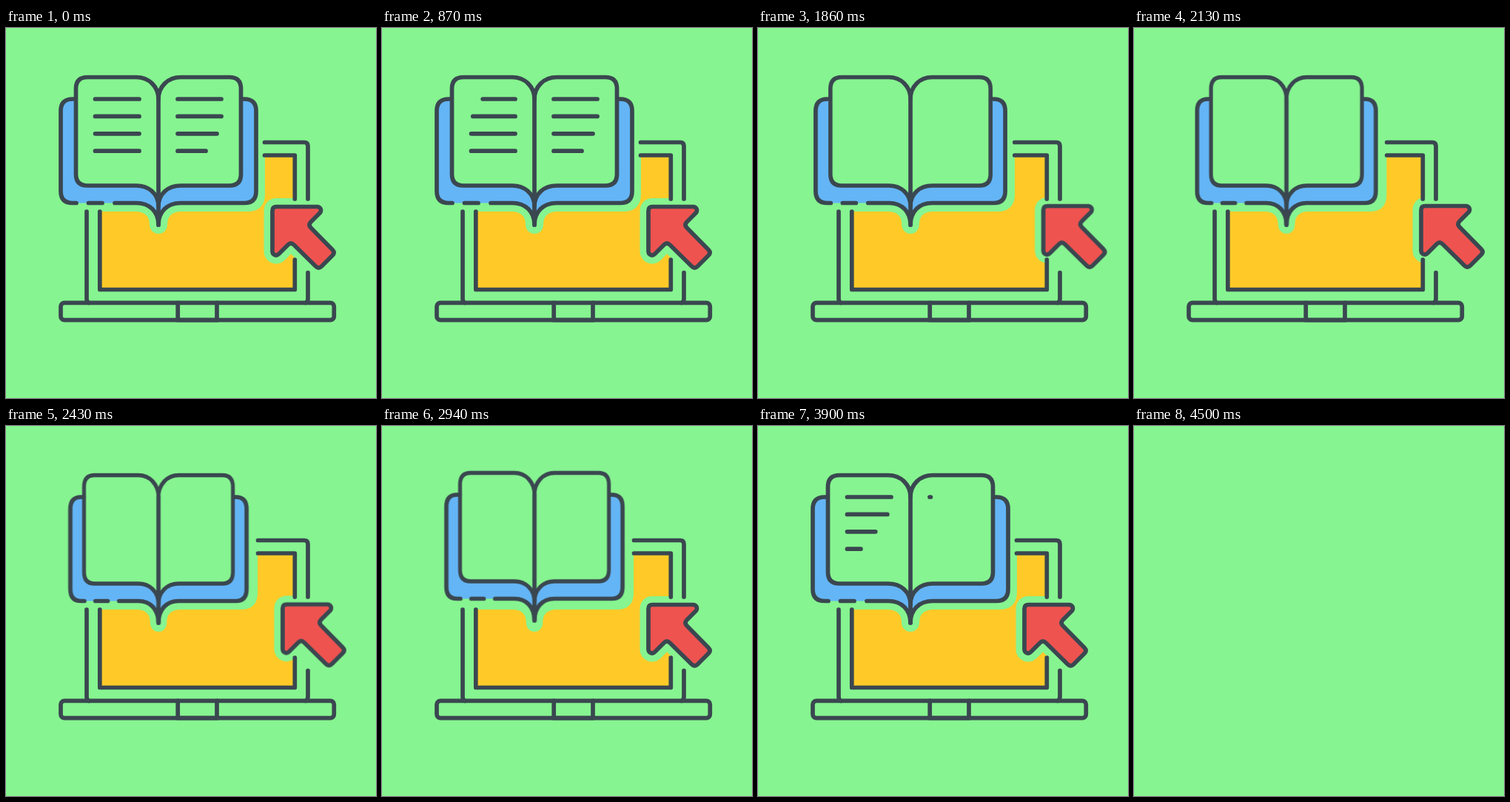
Recreate the animation shown at these times as an HTML page without scripts. Size 500 by 500 pixels, loop 4.53 s.

```html
<!DOCTYPE html>
<html lang="en">
<head>
<meta charset="utf-8">
<title>Online reading</title>
<style>
  :root { --bg: #86f490; --ink: #3a4750; }
  html, body { margin: 0; width: 100%; height: 100%; overflow: hidden; background: var(--bg); }
  svg { display: block; width: 500px; height: 500px; }

  .scene, .hop, .fold, .halo, .arrow, .edge, .row {
    animation: 4.53s cubic-bezier(.33, 0, .67, 1) infinite both;
  }
  .scene { animation-name: cut; animation-timing-function: step-end; }
  .hop { animation-name: hop; }
  .fold { animation-name: fold; transform-origin: 206px 0; }
  .halo { animation-name: halo; transform-origin: 206px 0; fill: var(--bg); }
  .arrow { animation-name: point; }
  .edge { animation-name: edge; stroke-dasharray: 300 300; }
  .row {
    --l: 60px;
    animation-name: write;
    animation-delay: calc(var(--i) * 78ms);
    stroke-dasharray: var(--l) 300px;
  }

  .ink { fill: none; stroke: var(--ink); stroke-width: 5.7; stroke-linecap: round; stroke-linejoin: round; }
  .fold .ink path { vector-effect: non-scaling-stroke; }
  .gap { fill: none; stroke: var(--bg); stroke-width: 23; stroke-linejoin: round; }

  @keyframes cut {
    0% { visibility: visible; }
    99.33%, 100% { visibility: hidden; }
  }
  @keyframes write {
    0%, 16.56% { stroke-dashoffset: 0px; }
    25% { stroke-dashoffset: -66px; }
    77.47% { stroke-dashoffset: -66px; animation-timing-function: step-end; }
    77.48% { stroke-dashoffset: calc(var(--l) + 6px); }
    85.9%, 100% { stroke-dashoffset: 0px; }
  }
  @keyframes point {
    0%, 29.14% { transform: none; }
    43.71%, 50.33% { transform: translate(28px, -1px); }
    56.95%, 100% { transform: none; }
  }
  @keyframes fold {
    0%, 35.76% { transform: scaleX(1); }
    50.33%, 71.52% { transform: scaleX(.902); }
    86.09%, 100% { transform: scaleX(1); }
  }
  @keyframes halo {
    0%, 35.76% { transform: scaleX(1); }
    50.33%, 71.52% { transform: scaleX(.932); }
    86.09%, 100% { transform: scaleX(1); }
  }
  @keyframes edge {
    0%, 35.76% { stroke-dashoffset: -9px; }
    50.33%, 71.52% { stroke-dashoffset: 0px; }
    86.09%, 100% { stroke-dashoffset: -9px; }
  }
  @keyframes hop {
    0%, 60.93% { transform: none; }
    70.2% { transform: translateY(-8px); }
    76.16% { transform: translateY(.3px); }
    80.13% { transform: translateY(-2.5px); }
    84.77%, 100% { transform: none; }
  }
</style>
</head>
<body>
<svg viewBox="0 0 500 500">
  <defs>
    <path id="pointer" d="M365.5 241.5H421A5 5 0 0 1 424.5 249.5L412 262Q408 266 412 270L441 299.5Q445 303.5 441 307.5L426.5 322Q422.5 326 418.5 322L389 293Q385 289 381 293L368.5 305.5A5 5 0 0 1 360 302V247Q360 241.5 365.5 241.5Z"/>
    <path id="pages" d="M206 96C206 79 193 66.5 176 66.5H110Q94.5 66.5 94.5 82V197.5Q94.5 213 110 213H176C193 213 206 224 206 241C206 224 219 213 236 213H302Q317.5 213 317.5 197.5V82Q317.5 66.5 302 66.5H236C219 66.5 206 79 206 96Z"/>
  </defs>

  <g class="scene">
    <!-- screen -->
    <rect x="127" y="172" width="263.5" height="181.5" fill="#ffca28"/>
    <path class="halo" d="M60 140H350V224Q350 248 326 248H236Q218 249 218 266A12 12 0 0 1 194 266Q194 249 176 248H60Z"/>
    <g class="arrow"><use href="#pointer" class="gap"/></g>

    <!-- laptop -->
    <g class="ink">
      <path d="M109 248V366Q109 370 112 371.5M408 330.5V366Q408 370 405 371.5"/>
      <path d="M126.8 248V353.5H390.3V313"/>
      <path class="edge" d="M340.5 154.5H403Q408 154.5 408 159.5V231"/>
      <path class="edge" d="M340.5 172H390.3V231"/>
      <rect x="74" y="371.3" width="369.3" height="23.4" rx="5"/>
      <path d="M232.2 371.3V394.7H285V371.3"/>
    </g>

    <!-- book -->
    <g class="hop"><g class="fold">
      <path fill="#64b5f6" d="M90 96Q74 96 74 112V220.5Q74 236.5 90 236.5H176C194 236.5 206 248 206 266C206 248 218 236.5 236 236.5H322Q338 236.5 338 220.5V112Q338 96 322 96Z"/>
      <use href="#pages" fill="var(--bg)"/>
      <g class="ink">
        <path d="M94 96H90Q74 96 74 112V220.5Q74 236.5 90 236.5H95M111.500 236.500H130M147 236.500H176C194 236.500 206 248 206 266C206 248 218 236.500 236 236.500H322Q338 236.500 338 220.500V112Q338 96 322 96H318"/>
        <use href="#pages"/>
        <path d="M206 96V266"/>
      </g>
      <g class="ink">
        <line class="row" style="--i:0" x1="120.500" x2="180" y1="96" y2="96"/>
        <line class="row" style="--i:1" x1="120.500" x2="180" y1="119.400" y2="119.400"/>
        <line class="row" style="--i:2" x1="120.500" x2="180" y1="142.800" y2="142.800"/>
        <line class="row" style="--i:3" x1="120.500" x2="180" y1="166.200" y2="166.200"/>
        <line class="row" style="--i:4" x1="232" x2="291" y1="96" y2="96"/>
        <line class="row" style="--i:5" x1="232" x2="291" y1="119.400" y2="119.400"/>
        <line class="row" style="--i:6;--l:53px" x1="232" x2="291" y1="142.800" y2="142.800"/>
        <line class="row" style="--i:7;--l:38px" x1="232" x2="291" y1="166.200" y2="166.200"/>
      </g>
    </g></g>

    <!-- pointer -->
    <g class="arrow ink"><use href="#pointer" fill="#ef5350"/></g>
  </g>
</svg>
</body>
</html>
```
